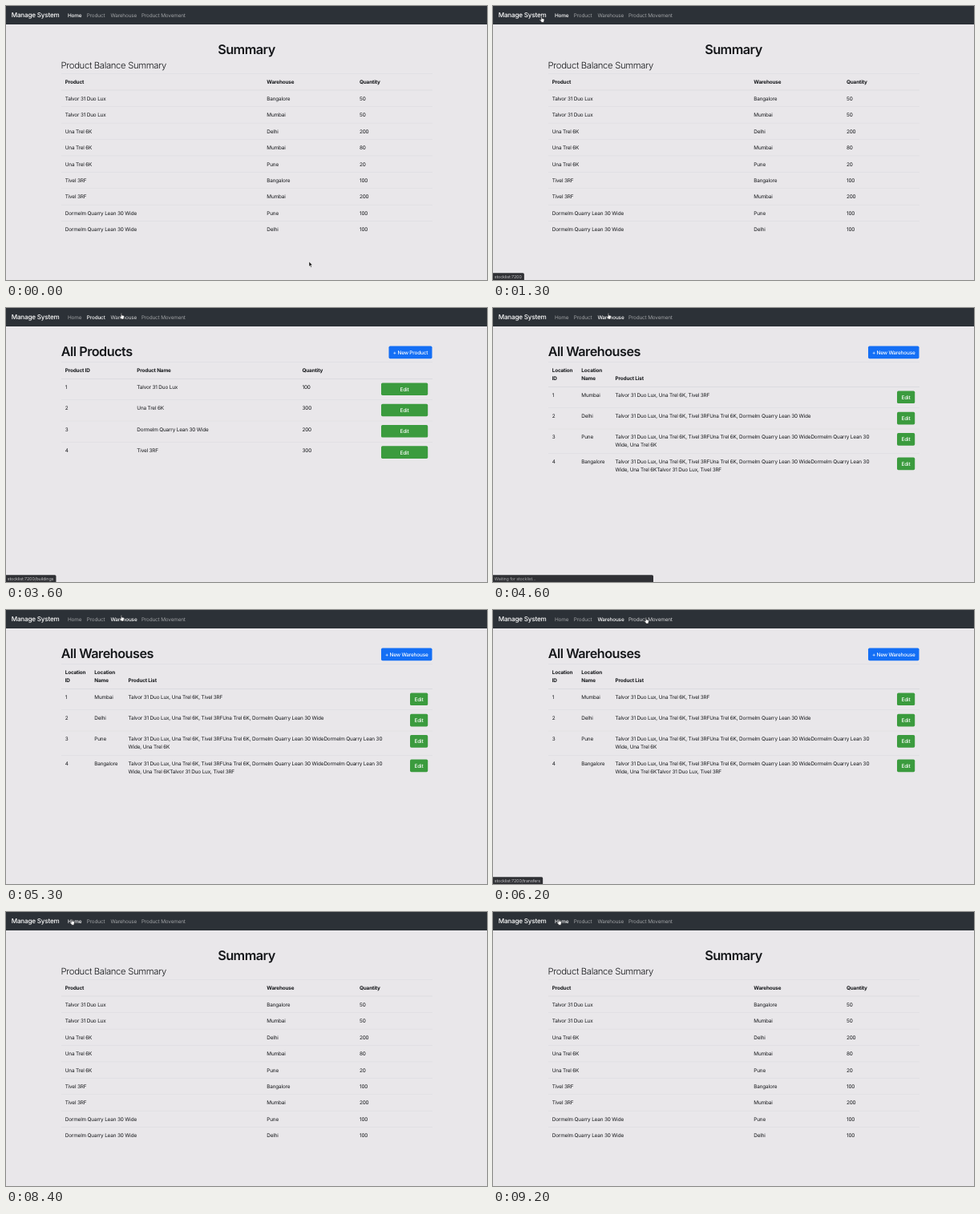
These frames come from a looping animation (600 by 342 pixels, 10000 ms). An HTML page:

```html
<!DOCTYPE html>
<html lang="en">
<head>
<meta charset="utf-8">
<title>Manage System</title>
<style>
  html, body { margin: 0; width: 100%; height: 100%; overflow: hidden; background: #e9e7ea; }
  svg { display: block; width: 600px; height: 342px; }
  text {
    font: 400 6.4px Inter, "Open Sans", sans-serif; letter-spacing: -.025em;
    fill: #15171a; white-space: pre; text-rendering: geometricPrecision;
  }
  .th { font-weight: 700; }
  .h1 { font-size: 16.2px; font-weight: 600; letter-spacing: -.03em; }
  .h3 { font-size: 11.3px; font-weight: 300; letter-spacing: -.03em; }
  .brand { font-size: 8.15px; font-weight: 500; fill: #fff; }
  .label { fill: #fff; font-weight: 500; }
  .mid { text-anchor: middle; }
  .tip { font-size: 5.4px; fill: #c2c2c5; }
</style>
</head>
<body>
<svg id="stage" viewBox="0 0 600 342"></svg>
<script>
const LOOP = 10000, STEP = 100;
const NS = 'http://www.w3.org/2000/svg';
const stage = document.getElementById('stage');

function add(parent, tag, attrs, content) {
  const el = document.createElementNS(NS, tag);
  for (const key in attrs) el.setAttribute(key, attrs[key]);
  if (content !== undefined) el.textContent = content;
  parent.appendChild(el);
  return el;
}
const write = (g, x, y, str, cls = '') => add(g, 'text', { x, y, class: cls }, str);
const rect = (g, x, y, width, height, fill, rx = 0) => add(g, 'rect', { x, y, width, height, fill, rx });
const rule = (g, y, height = .5) => rect(g, 69, y, 463, height, '#d9d9dd');

function button(g, x, y, right, label, fill) {
  rect(g, x, y, right - x, 15.6, fill, 1.7);
  write(g, (x + right) / 2, y + 10.2, label, 'label mid');
}
const create = (g, x, label) => button(g, x, 47.6, 531.5, label, '#146ff5');
const edit = (g, x, y) => button(g, x, y, 526.2, 'Edit', '#3b9b3e');

function row(g, cols, y, cells, cls) {
  cells.forEach((cell, i) => write(g, cols[i], y, cell, cls));
}

const [A, B, C, D] = ['Talvor 31 Duo Lux', 'Una Trel 6K', 'Tivel 3RF', 'Dormelm Quarry Lean 30 Wide'];
const [BLR, MUM, DEL, PUN] = ['Bangalore', 'Mumbai', 'Delhi', 'Pune'];

function newPage() {
  return add(stage, 'g', { visibility: 'hidden' });
}

function summaryPage() {
  const g = newPage(), cols = [73.7, 325.3, 441];
  write(g, 300, 60.4, 'Summary', 'h1 mid');
  write(g, 68.5, 78.4, 'Product Balance Summary', 'h3');
  rule(g, 84.3);
  row(g, cols, 97.3, ['Product', 'Warehouse', 'Quantity'], 'th');
  rule(g, 104.6, .8);
  [[A, BLR, 50], [A, MUM, 50], [B, DEL, 200], [B, MUM, 80], [B, PUN, 20],
   [C, BLR, 100], [C, MUM, 200], [D, PUN, 100], [D, DEL, 100]].forEach((cells, i) => {
    row(g, cols, 117.9 + i * 20.42, cells);
    if (i) rule(g, 105 + i * 20.42);
  });
  return g;
}

// Heading, create button, header row and evenly spaced rows with edit buttons.
function listPage(title, action, actionX, cols, head, rows, editX) {
  const g = newPage();
  write(g, 68.8, 60.4, title, 'h1');
  create(g, actionX, action);
  rule(g, 67.4);
  row(g, cols, 80.3, head, 'th');
  rule(g, 88, .8);
  rows.forEach((cells, i) => {
    const y = 88.2 + i * 26.3;
    row(g, cols, y + 12.8, cells);
    edit(g, editX, y + 5.2);
    if (i) rule(g, y);
  });
  return g;
}

function warehousePage() {
  const g = newPage(), cols = [73.7, 110.3, 152.5];
  write(g, 68.8, 60.4, 'All Warehouses', 'h1');
  create(g, 468, '+ New Warehouse');
  rule(g, 67.4);
  row(g, cols, 80.3, ['Location', 'Location'], 'th');
  row(g, cols, 90.2, ['ID', 'Name', 'Product List'], 'th');
  rule(g, 98, .8);
  const one = `${A}, ${B}, ${C}`;
  const two = `${one}${B}, ${D}`;
  const long = two + D.replace(/ \w+$/, '');
  const last = D.split(' ').pop();
  [[98.2, MUM, one], [124.5, DEL, two],
   [150.8, PUN, long, `${last}, ${B}`],
   [181.3, BLR, long, `${last}, ${B}${A}, ${C}`]].forEach(([y, name, first, second], i) => {
    row(g, cols, y + 12.6, [i + 1, name, first]);
    if (second) write(g, cols[2], y + 22.6, second);
    edit(g, 504, y + 5.3);
    if (i) rule(g, y);
  });
  return g;
}

const day = '2019-12-26', none = '---';
const moves = [
  [A, none, BLR, 100], [B, none, DEL, 300], [A, BLR, MUM, 50],
  [D, none, PUN, 200], [C, none, BLR, 300], [B, DEL, MUM, 100],
  [C, BLR, MUM, 200], [D, PUN, DEL, 100], [B, MUM, PUN, 20]
].map((m, i) => [i + 1, ...m, day]);

const pages = [
  summaryPage(),
  listPage('All Products', '+ New Product', 477.5, [73.7, 163.3, 369.5],
    ['Product ID', 'Product Name', 'Quantity'],
    [[1, A, 100], [2, B, 300], [3, D, 200], [4, C, 300]], 468),
  warehousePage(),
  listPage('All Movements', '+ New Movement', 470, [73.7, 97.8, 240.5, 297.4, 355, 408.7],
    ['ID', 'Product', 'From', 'To', 'Quantity', 'Date'], moves, 488.7)
];

rect(stage, 0, 0, 600, 23, '#2c3137');
write(stage, 6.7, 14.1, 'Manage System', 'brand');
const links = [[77, 94.5, 'Home'], [100.8, 124, 'Product'], [130.4, 163, 'Warehouse'], [169, 224.5, 'Product Movement']]
  .map(([left, right, name]) => ({ left, right, el: write(stage, left, 13.8, name) }));

const tip = add(stage, 'g', {});
const tipBox = rect(tip, -3, 333.2, 60, 12, '#2f3034', 1.6);
const tipText = write(tip, 1.8, 339.6, '', 'tip');

const arrow = add(stage, 'path', {
  d: 'M0 0V6.2L1.4 4.9L2.4 7.2L3.4 6.8L2.4 4.5H4.3Z',
  fill: '#111', stroke: '#fff', 'stroke-width': .5
});
const hand = add(stage, 'path', {
  d: 'M-.7 .6Q0-.4 .6 .6V2.7L2.8 3.2Q3.6 3.5 3.5 4.4L3 6.3V7.6H-.5V6.6L-2.6 4.3Q-2.6 3.4-1.7 3.8L-.7 4.5Z',
  fill: '#fff', stroke: '#15171a', 'stroke-width': .6
});

// [time, x, y]
const path = [
  [0, 378, 319], [400, 20, 14], [900, 20, 14], [1800, 117.3, 11.4], [3000, 117.3, 11.4],
  [3300, 144, 6.4], [5400, 144, 6.4], [5900, 191, 9.4], [7000, 191, 9.4],
  [7400, 68.3, 6.6], [7800, 68.3, 6.6], [8200, 82, 8.6], [LOOP, 82, 8.6]
];
// [time, page]
const visits = [[0, 0], [2500, 1], [3900, 2], [7000, 3], [8300, 0]];
// [time, text, width]
const host = 'stocklist:7200';
const tips = [
  [0, ''], [900, host], [1700, host + '/articles'], [2700, ''], [3500, host + '/buildings'],
  [4000, 'Waiting for stocklist...', 200], [5000, ''], [6000, host + '/transfers'], [7000, '']
];

const current = (table, t) => table.filter(entry => entry[0] <= t).pop();
const ease = k => k * k * (3 - 2 * k);

function cursorAt(t) {
  const i = path.findIndex(p => p[0] > t);
  const [t0, x0, y0] = path[i - 1], [t1, x1, y1] = path[i];
  const k = ease((t - t0) / (t1 - t0));
  return [x0 + (x1 - x0) * k, y0 + (y1 - y0) * k];
}

function draw(t) {
  const [x, y] = cursorAt(t);
  const page = current(visits, t)[1];
  pages.forEach((g, i) => g.setAttribute('visibility', i === page ? 'visible' : 'hidden'));

  const inBar = y < 23;
  links.forEach(({ left, right, el }, i) => {
    const hover = inBar && x >= left && x <= right;
    const trail = page === 3 && i === 2;
    const alpha = i === page ? 1 : hover || trail ? .8 : .55;
    el.style.fill = `rgba(255,255,255,${alpha})`;
    el.style.fontWeight = i === page ? 500 : 400;
  });

  const [, label, width] = current(tips, t);
  tip.setAttribute('visibility', label ? 'visible' : 'hidden');
  if (label) {
    tipText.textContent = label;
    tipText.style.fill = width ? '#a6a6aa' : '#c2c2c5';
    tipBox.setAttribute('width', (width || tipText.getComputedTextLength() + 5) + 3);
  }

  const place = `translate(${x} ${y})`;
  arrow.setAttribute('transform', place);
  hand.setAttribute('transform', place);
  arrow.setAttribute('visibility', inBar ? 'hidden' : 'visible');
  hand.setAttribute('visibility', inBar ? 'visible' : 'hidden');
}

const start = performance.now();
function tick() {
  const t = (performance.now() - start) % LOOP;
  draw(Math.floor(t / STEP) * STEP);
  requestAnimationFrame(tick);
}
tick();
</script>
</body>
</html>
```
